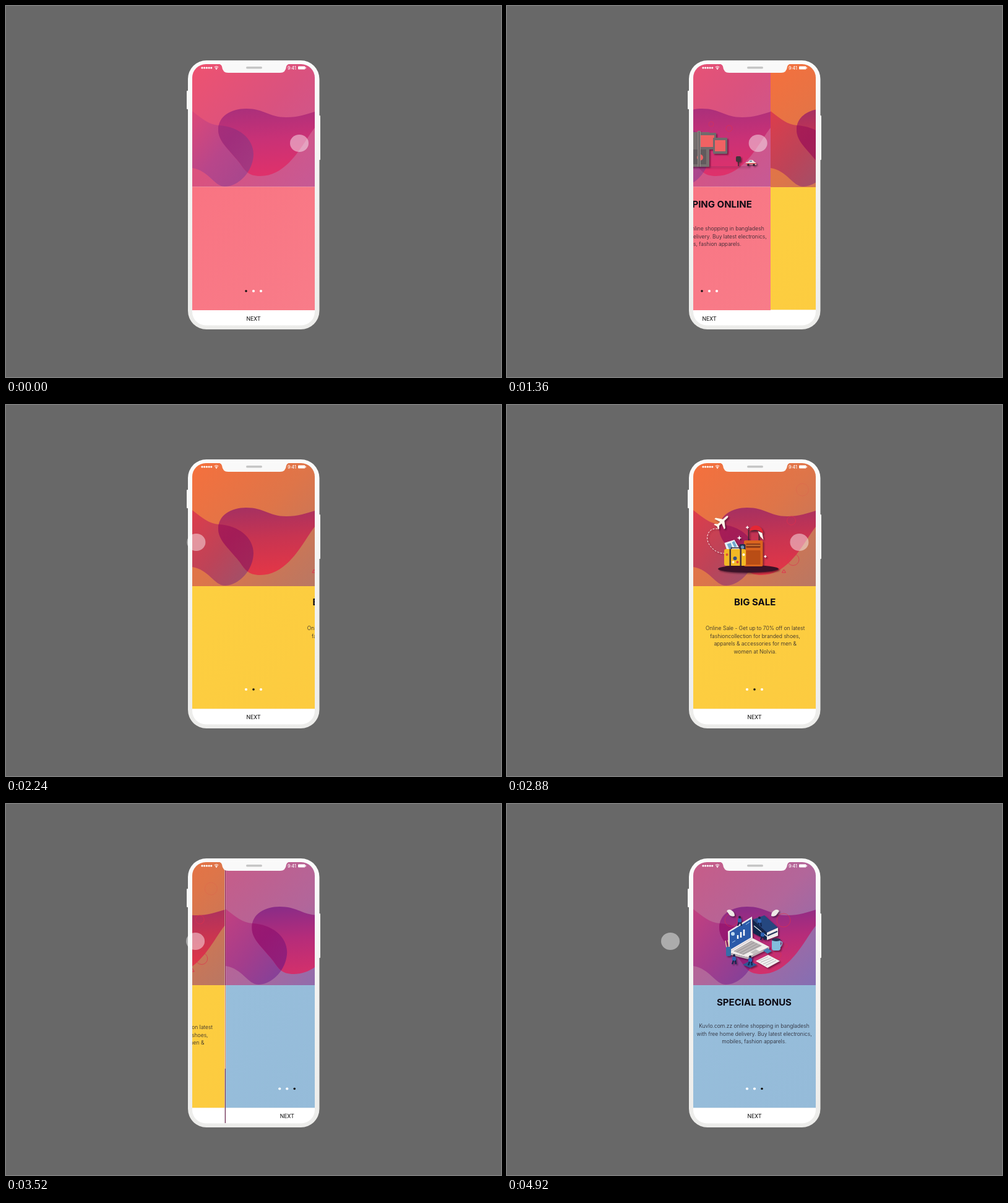
Write an HTML page that moves like this. It is 800x600 px and loops after 6680 ms.

```html
<!DOCTYPE html>
<html lang="en">
<head>
<meta charset="utf-8">
<title>Shop onboarding</title>
<style>
  html, body { margin: 0; width: 100%; height: 100%; overflow: hidden; background: #686868; }
  svg { display: block; width: 800px; height: 600px; }
  text { font-family: Inter, sans-serif; text-anchor: middle; }
  .title { font-size: 15px; font-weight: 700; fill: #0c0a14; }
  .body { font-size: 8.6px; font-weight: 300; fill: #221e28; }
  .next { font: 400 9.2px Roboto, sans-serif; fill: #111; }
  .clock { font-size: 7px; font-weight: 500; fill: #fff; }
  .art { filter: drop-shadow(2px 2px 1px rgba(20, 0, 20, .45)); }
  .rings { fill: none; stroke: #e0304e; stroke-width: 1; }
</style>
</head>
<body>
<svg viewBox="0 0 800 600" id="stage"></svg>
<script>
const LOOP = 6680, STEP = 40, WIDTH = 198, GAP = 2;

const LEFT_BLOB = 'M301 170C318 183 328 192 344 193C376 195 400 214 400 240C399 270 374 292 354 292C336 292 328 266 301 262Z';
const RIGHT_BLOB = 'M343 200C343 178 364 166 388 166C418 166 424 180 453 180C472 180 486 175 499 171V197C482 217 458 275 411 275C386 275 386 262 371 246C356 228 343 217 343 200Z';

const poly = (points, fill) => `<polygon points="${points}" fill="${fill}"/>`;
const rect = (x, y, w, h, fill, r = 0) => `<rect x="${x}" y="${y}" width="${w}" height="${h}" rx="${r}" fill="${fill}"/>`;
const dot = (x, y, r, fill) => `<circle cx="${x}" cy="${y}" r="${r}" fill="${fill}"/>`;
const ring = (x, y, r, opacity = .7) => `<circle cx="${x}" cy="${y}" r="${r}" opacity="${opacity}"/>`;
const line = (d, stroke, width = 1, extra = '') => `<path d="${d}" fill="none" stroke="${stroke}" stroke-width="${width}" ${extra}/>`;
const sparkle = (x, y, s) => `<path d="M${x} ${y - s}l1 ${s - 1} ${s - 1} 1-${s - 1} 1-1 ${s - 1}-1-${s - 1}-${s - 1}-1 ${s - 1}-1z" fill="#fff"/>`;
const person = (x, y) => dot(x, y - 6, 2, '#1b2444') + rect(x - 3, y - 4, 6, 7, '#2f62b4', 2)
  + line(`M${x - 1} ${y + 2}l-2 6M${x + 2} ${y + 2}l1 6`, '#14264e', 2.2);
const gradient = (id, stops, x2 = 1, y2 = 1) => `<linearGradient id="${id}" x2="${x2}" y2="${y2}">`
  + stops.map((c, i) => `<stop offset="${i / (stops.length - 1)}" stop-color="${c}"/>`).join('') + '</linearGradient>';

const panel = (x, y, w, h) => rect(x, y, w, h, '#716a6c', 1) + rect(x + 3, y + 4, w - 6, h - 8, '#f06263');
const shrub = x => rect(x - .7, 250, 1.4, 9, '#33262c') + rect(x - 4, 243, 8, 9, '#42343b', 2);

function storeArt() {
  return line('M338 260H464', '#8d356a', .6)
    + panel(336, 213, 24, 26) + panel(352, 205, 32, 27)
    + rect(365, 204, 35, 56, '#77706f', 1) + rect(368, 232, 27, 24, '#615a5d')
    + dot(385, 245, 5, '#f06263')
    + panel(379, 205, 32, 27) + panel(406, 213, 23, 26)
    + rect(381, 202, 5, 58, '#8a8381', 1) + line('M383.5 203V260', '#59494f', 1)
    + shrub(447) + shrub(337)
    + '<path d="M459 256v-3l4-1 2-3h5l3 3 3 2v3z" fill="#eee4e1"/>'
    + rect(465, 250, 4, 2, '#6c92a6') + rect(459, 254, 17, 2, '#dc575f')
    + dot(463, 257, 1.8, '#282028') + dot(472, 257, 1.8, '#282028');
}

function travelArt() {
  const plane = `<path transform="translate(348.5 189) rotate(47) scale(.88)" fill="#fff8ea"
    d="M0-16Q2-15 2-10V-5L13 3V6L2 2V8L6 12V14L0 12-6 14V12L-2 8V2L-13 6V3L-2-5V-10Q-2-15 0-16Z"/>`;
  return '<ellipse cx="391.5" cy="265" rx="49" ry="6" fill="#3b1227"/>'
    + line('M342 200C325 198 322 216 328 225C334 235 343 240 353 240', '#fff', .9, 'stroke-dasharray="3 2"') + plane
    + poly('353,223 369,218 378,233 358,238', '#e9f0f4') + poly('357,225 363,223 366,231 361,234', '#70a9cf')
    + poly('365,222 369,220 373,229 369,230', '#70a9cf')
    + line('M392 220V203H409V220', '#3c2630', 1.6)
    + rect(384.5, 219, 30.5, 42, '#da641e', 2) + rect(388, 224, 23, 7, '#8e3b18', 1)
    + rect(388, 235, 23, 23, '#b94d15', 1) + line('M388 227H411', '#ef9140', 1.2)
    + '<path d="M393 204Q396 194 405 195Q414 196 416 208Q406 199 393 204Z" fill="#e52735"/>'
    + '<path d="M407 204l7 3 2 11-5-5z" fill="#fff0ea"/>'
    + rect(377, 225, 10, 10, '#24304f', 2) + dot(382, 230, 2.7, '#6c94b5')
    + line('M364 236V231H379V236', '#352735', 1.6)
    + rect(352.5, 233, 35, 27, '#f2b825', 3) + rect(361, 233, 2.5, 27, '#46313a') + rect(378, 233, 2.5, 27, '#46313a')
    + dot(370, 248, 3, '#344c82') + dot(357, 242, 2, '#dd4f36') + dot(374, 254, 2, '#dc4537')
    + dot(384, 242, 2, '#fff') + dot(367, 254, 2, '#fff2cb')
    + sparkle(377, 215, 4) + sparkle(390, 198, 3) + sparkle(419, 245, 2.5);
}

function officeArt() {
  const cloud = (x, dir) => `<path transform="translate(${x} 177) scale(${dir} 1)" fill="#eee9e6"
    d="M-7-4Q-4-8 1-5Q6-2 6 4Q2 6-2 3Z"/>`;
  return cloud(362, 1) + cloud(433, -1)
    + poly('397,187 416,180 438,200 420,208', '#25477f') + poly('397,187 420,208 420,220 398,209', '#10264c')
    + poly('420,208 438,200 438,213 420,220', '#eeebeb') + line('M421 213L437 206', '#23345b', 2)
    + line('M399 197L420 214', '#dfe3ea', 1.2)
    + poly('357,206 396,182 397,217 358,240', '#ece9ea') + poly('360,207 394,186 394,216 360,236', '#2a5aa9')
    + line('M373 218V212M378 216V207M383 213V203', '#fff', 2.5) + dot(365, 210, 3, '#bcd9f1')
    + line('M386 195L392 191M364 224L369 221', '#9bc2e8', 1)
    + poly('358,240 397,217 424,231 389,248', '#f1eeeb') + poly('358,240 389,248 424,231 424,234 389,251 358,243', '#b9b2b5')
    + poly('366,238 395,221 412,229 382,244', '#aaa5a7') + poly('393,240 402,235 408,238 399,243', '#c4bfc0')
    + line('M369 238L397 223M374 240L402 225M379 242L407 227', '#d8d3d2', .8)
    + line('M355 232L353 221M359 231L357 220', '#e9c0a0', 1.5) + rect(354, 231, 8, 15, '#356da9', 2)
    + line('M441 223q5-1 3 4t-4 4', '#7fb4d5', 1.6) + rect(428, 219, 14, 18, '#83bddd', 4)
    + '<ellipse cx="435" cy="219.5" rx="7" ry="2.6" fill="#263556"/>'
    + poly('414,237 421,233 428,238 421,242', '#477fb8')
    + poly('402,254 422,244 441,254 421,265', '#f0eeee')
    + line('M406 254L422 247M410 256L427 249M414 259L431 251M418 261L435 253', '#aaa5aa', .8)
    + poly('381,260 392,254 404,260 393,265', '#2d5795')
    + person(376, 189) + person(408, 190) + person(413, 212) + person(367, 251) + person(393, 253);
}

const shopText = ['Kuvlo.com.zz online shopping in bangladesh', 'with free home delivery. Buy latest electronics,', 'mobiles, fashion apparels.'];

// "enter" is [start, duration, title offset, body offset, art offset, ring offset]
const pages = [
  { place: 0,
    top: ['#ee5270', '#d9527f', '#c65a95'], low: ['#f97482', '#f87c89'],
    left: ['#dc4878', '#b8468a', '#a3478e'], right: ['#a92f7b', '#c93176', '#de316b'], both: ['#b02c76', '#a02e7c', '#a43d82'],
    split: 292.5, footer: 492, dotsY: 461, nextY: 509,
    title: 'SHOPPING ONLINE', titleY: 326, body: shopText, bodyY: 363,
    art: storeArt(), rings: ring(432, 198, 5) + ring(403, 191, 4, .5) + ring(433, 240, 4, .5),
    enter: [300, 740, 185, 200, -200, 70] },
  { place: WIDTH,
    top: ['#f5703d', '#de7549', '#b97763'], low: ['#fdcf40', '#fccb40'],
    left: ['#dd3d4b', '#bd4358', '#9b536d'], right: ['#a43062', '#c83451', '#e23647'], both: ['#b01f54', '#a31c57', '#a02a5b'],
    split: 293, footer: 491.5, dotsY: 460, nextY: 508,
    title: 'BIG SALE', titleY: 323.5,
    body: ['Online Sale - Get up to 70% off on latest', 'fashioncollection for branded shoes,', 'apparels & accessories for men &', 'women at Nolvia.'], bodyY: 364,
    art: travelArt(), rings: ring(459, 187, 7) + ring(462, 250, 9.5) + ring(477, 137, 10, .12) + '<path d="M447 266l3 5h-6z"/>',
    enter: [1930, 1000, 168, 217, -211, 66] },
  { place: 2 * WIDTH + GAP,
    top: ['#c75c88', '#b2669a', '#846fb3'], low: ['#97bedb', '#95bbd9'],
    left: ['#c24080', '#a33d8c', '#7c429c'], right: ['#872c88', '#b52c7a', '#d1306c'], both: ['#a01b70', '#961873', '#8e237f'],
    split: 293, footer: 491.5, dotsY: 460.5, nextY: 508,
    title: 'SPECIAL BONUS', titleY: 326, body: shopText, bodyY: 362,
    art: officeArt(), rings: ring(447, 188, 11) + ring(437, 244, 6) + ring(450, 229, 3, .5) + ring(362, 188, 10, .6),
    seam: rect(299.5, 94, 1.5, 199, '#8d2148') + rect(299.5, 293, 1.5, 135, '#e28f60') + rect(299.5, 428, 1.5, 88, '#74365b'),
    enter: [3720, 1000, 185, 196, -211, 62] },
];

function pageMarkup(p, i) {
  const safe = s => s.replace(/&/g, '&amp;');
  const fill = name => `url(#${name}${i})`;
  return `<g class="page"><defs>${gradient('top' + i, p.top)}${gradient('low' + i, p.low)}
    ${gradient('left' + i, p.left)}${gradient('right' + i, p.right, .1, 1)}${gradient('both' + i, p.both)}</defs>
    ${p.seam || ''}
    ${rect(301, 94, WIDTH, p.split - 94, fill('top'))}
    ${rect(301, p.split, WIDTH, p.footer - p.split, fill('low'))}
    ${rect(301, p.footer, WIDTH, 517 - p.footer, '#fff')}
    <path d="${LEFT_BLOB}" fill="${fill('left')}"/><path d="${RIGHT_BLOB}" fill="${fill('right')}"/>
    <path d="${LEFT_BLOB}" fill="${fill('both')}" clip-path="url(#rightBlob)"/>
    <g clip-path="url(#pageBox)">
      <g class="part rings">${p.rings}</g>
      <g class="part"><g class="art">${p.art}</g></g>
      <g class="part"><text class="title" x="399.5" y="${p.titleY}">${p.title}</text></g>
      <g class="part">${p.body.map((s, n) => `<text class="body" x="399.5" y="${p.bodyY + n * 12.7}">${safe(s)}</text>`).join('')}</g>
    </g>
    ${[0, 1, 2].map(n => dot(388 + n * 12, p.dotsY, n === i ? 1.8 : 2.1, n === i ? '#111' : '#fff')).join('')}
    <text class="next" x="400" y="${p.nextY}">NEXT</text></g>`;
}

const stage = document.getElementById('stage');
stage.innerHTML = `<defs>
    <clipPath id="screen"><rect x="301" y="94" width="198" height="422.5" rx="22"/></clipPath>
    <clipPath id="pageBox"><rect x="301" y="94" width="198" height="423"/></clipPath>
    <clipPath id="rightBlob"><path d="${RIGHT_BLOB}"/></clipPath>
    ${gradient('shell', ['#fbfbfb', '#f2f2f0', '#ececea'], 0, 1)}
  </defs>
  ${rect(0, 0, 800, 600, '#686868')}
  ${rect(292, 137, 4, 30, '#f4f4f2', 1)}${rect(504, 177, 4, 72, '#f4f4f2', 1)}
  ${rect(294, 88, 212.5, 435, 'url(#shell)', 30)}
  <g clip-path="url(#screen)">${pages.map(pageMarkup).join('')}</g>
  <path d="M343 93.5Q348 94 349 98Q350 108 359 108H443Q452 108 453 98Q454 94 459 93.5Z" fill="#f9f9f9"/>
  ${rect(388, 98, 26, 3.5, '#c6c6c6', 1.7)}
  ${[0, 1, 2, 3, 4].map(n => dot(317 + n * 3.7, 100, 1.6, '#fff')).join('')}
  ${line('M336.8 99.2Q340 96.4 343.2 99.2M338.2 100.9Q340 99.3 341.8 100.9', '#fff', 1.1)}${dot(340, 102.2, .9, '#fff')}
  <text class="clock" x="462" y="102.7">9:41</text>
  ${rect(472, 97.6, 11.5, 5, '#fff', 1)}${rect(484, 99, 1, 2.2, '#fff')}
  <ellipse id="touch" rx="15" ry="14" cy="222" fill="#fff" opacity=".45"/>`;

const pageNodes = [...stage.querySelectorAll('.page')];
const partNodes = pageNodes.map(node => [...node.querySelectorAll('.part')]);
const touch = document.getElementById('touch');

const progress = (t, start, length) => Math.min(1, Math.max(0, (t - start) / length));
const smooth = (t, start, length) => { const p = progress(t, start, length); return p * p * (3 - 2 * p); };
const shift = (node, x) => node.setAttribute('transform', `translate(${x.toFixed(2)} 0)`);

function draw(t) {
  const scroll = WIDTH * progress(t, 1065, 800) + (WIDTH + GAP) * progress(t, 2937, 800);
  pages.forEach((page, i) => {
    shift(pageNodes[i], page.place - scroll);
    const [start, length, title, body, art, rings] = page.enter;
    const left = 1 - smooth(t, start, length);
    [rings, art, title, body].forEach((offset, n) => {
      shift(partNodes[i][n], offset * left);
      partNodes[i][n].style.visibility = t < start ? 'hidden' : 'visible';
    });
  });
  touch.setAttribute('cx', 474 - 216 * smooth(t, 1060, 800) + 216 * smooth(t, 1930, 1000) - 210 * smooth(t, 2950, 800));
}

function tick() {
  const t = Math.floor(performance.now() % LOOP / STEP) * STEP;
  draw(t < 360 ? 0 : t);
  requestAnimationFrame(tick);
}
tick();
</script>
</body>
</html>
```
